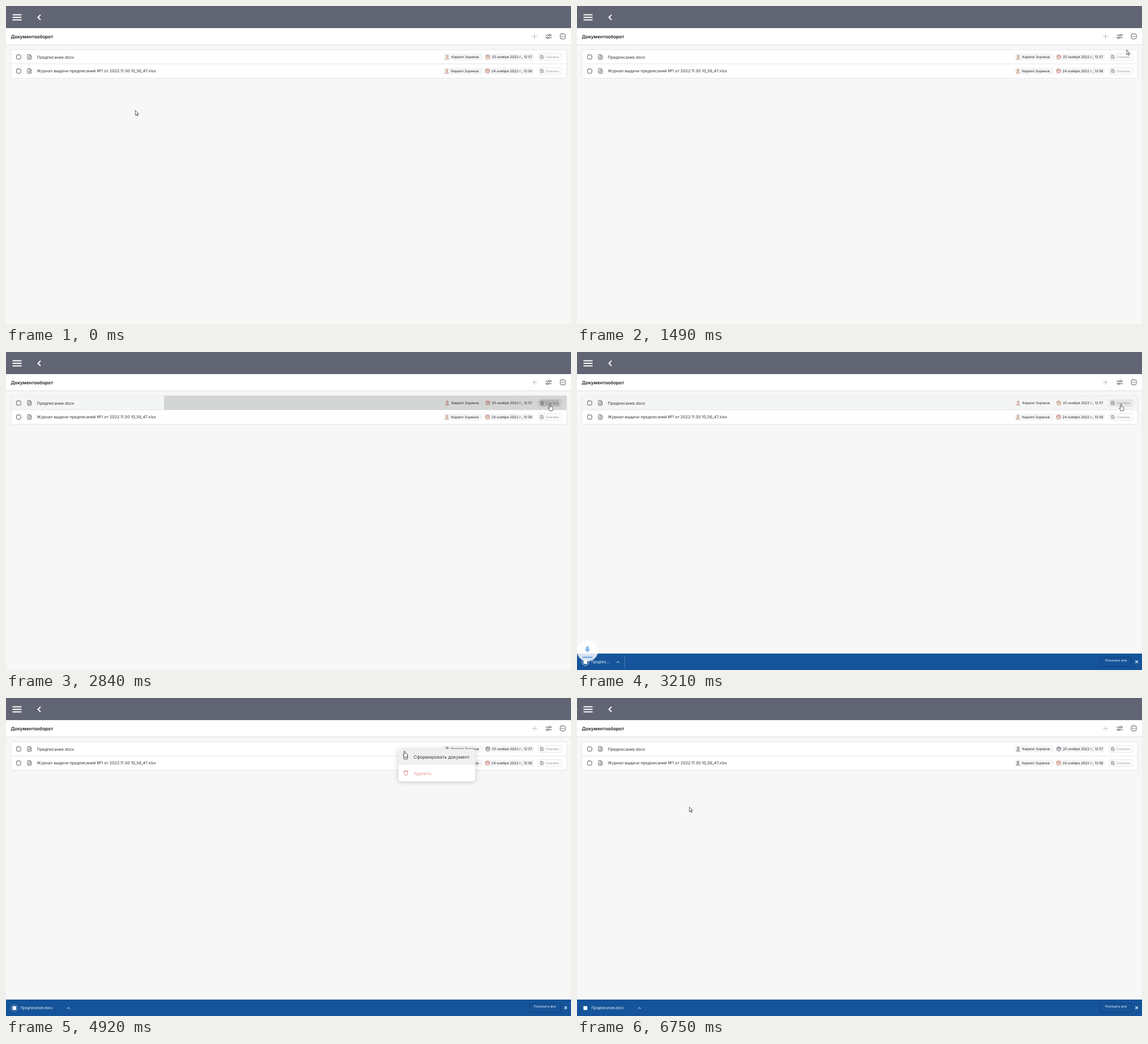
These frames come from a looping animation (998 by 561 pixels, 6780 ms). An HTML page:

```html
<!DOCTYPE html>
<html lang="ru">
<head>
<meta charset="utf-8">
<title>Документооборот</title>
<style>
html, body { margin: 0; width: 100%; height: 100%; overflow: hidden; background: #f7f7f7; }
#stage { position: relative; width: 998px; height: 561px; overflow: hidden; }
svg { position: absolute; left: 0; top: 0; display: block; overflow: visible; }
text { font-family: Inter, sans-serif; text-rendering: geometricPrecision; }
.title { font-size: 8.1px; font-weight: 600; fill: #1b1b1f; }
.file { font-size: 7.15px; fill: #333338; }
.meta { font-size: 6.1px; fill: #26262b; }
.save { font-size: 6.1px; fill: #96969b; }
.item { font-size: 8px; fill: #3c3c42; }
.line { fill: none; stroke: #45454c; stroke-width: .9; stroke-linecap: round; stroke-linejoin: round; }
.white { fill: none; stroke: #fff; stroke-width: 2; }
.chip { fill: #f4f5f6; }

.move, .step { animation: 6780ms linear infinite; }
.step { animation-timing-function: step-end; }

#cursor { animation-name: travel; }
#arrow { animation-name: arrow; }
#hand { animation-name: hand; }
#hover1 { animation-name: hover1; }
#hover2 { animation-name: hover2; }
#hoverBtn { animation-name: hoverBtn; }
#hoverItem { animation-name: hoverItem; }
#press { animation-name: press; }
#menu { animation-name: menu; transform-origin: 693px 90px; filter: drop-shadow(0 1.5px 4px rgba(0,0,0,.2)); }
#wave { animation-name: wave; }
#waveBtn { animation-name: waveBtn; }
.tint { animation-name: tint; }

@keyframes travel {
  0%, 2.51% { transform: translate(228px, 184px); }
  6.9% { transform: translate(500px, 173.5px); }
  12.1%, 12.54% { transform: translate(791px, 192px); }
  21.97%, 23.6% { transform: translate(970.5px, 77px); }
  29.94%, 48.97% { transform: translate(961px, 92px); }
  58.56%, 59% { transform: translate(716px, 90px); }
  65%, 69.47% { transform: translate(693px, 89.5px); }
  72.57% { transform: translate(704px, 93px); }
  78.32%, 79.5% { transform: translate(720px, 136px); }
  87.9%, 90.56% { transform: translate(520px, 246px); }
  99.56%, 100% { transform: translate(198px, 192px); }
}
@keyframes arrow {
  0%, 21.8% { opacity: 1; }
  17.9%, 23.8%, 76.5% { opacity: 0; }
  76.5%, 100% { opacity: 1; }
}
@keyframes hand {
  0%, 21.8% { opacity: 0; }
  17.9%, 23.8% { opacity: 1; }
  76.5%, 100% { opacity: 0; }
}
@keyframes hover2 { 0%, 19.9%, 100% { opacity: 0; } 17.9% { opacity: 1; } }
@keyframes hover1 { 0%, 21.7%, 67.9%, 100% { opacity: 0; } 19.9%, 23.8% { opacity: 1; } }
@keyframes hoverBtn { 0%, 49.8%, 100% { opacity: 0; } 25% { opacity: 1; } }
@keyframes hoverItem { 0%, 76%, 100% { opacity: 0; } 69.6% { opacity: 1; } }
@keyframes press {
  0%, 65%, 68%, 100% { opacity: 0; }
  65.5%, 67% { opacity: 1; }
}
@keyframes menu {
  0%, 67.4% { opacity: 0; transform: scale(.8); }
  68.9%, 76.4% { opacity: 1; transform: none; }
  78.2%, 100% { opacity: 0; transform: none; }
}
@keyframes wave {
  0%, 40.4% { transform: scale(0); opacity: .13; animation-timing-function: cubic-bezier(.4, 0, .2, 1); }
  43.73%, 44.25% { transform: scale(1); opacity: .13; }
  46.5%, 100% { transform: scale(1); opacity: 0; }
}
@keyframes waveBtn {
  0%, 40.4% { transform: scale(0); opacity: .1; animation-timing-function: cubic-bezier(.4, 0, .2, 1); }
  43.73%, 44.25% { transform: scale(1); opacity: .1; }
  46.5%, 100% { transform: scale(1); opacity: 0; }
}
@keyframes tint { 0% { stroke: #b5694a; } 67.9%, 100% { stroke: #4a4a52; } }

#bar { position: absolute; left: 0; top: 531.5px; width: 998px; height: 29.5px; background: #15549a; animation-name: bar; }
#bar, #bar span { font: 6.25px "Open Sans", "Noto Sans", sans-serif; color: #fff; }
#load { position: absolute; left: 0; top: 0; height: 29.5px; overflow: hidden; animation-name: load; }
#load::after { content: ""; position: absolute; right: 0; top: 4px; width: .8px; height: 22px; background: #4a7db4; }
#name { position: absolute; left: 25.5px; right: 25px; top: 10px; line-height: 10px; white-space: nowrap; overflow: hidden; text-overflow: ellipsis; }
#caret { right: 9px; left: auto; top: 12px; }
#all { position: absolute; left: 924px; top: 6.5px; width: 54px; height: 15px; border: .8px solid #0d3f78; border-radius: 2px; text-align: center; font-size: 6.1px !important; line-height: 15px; }
#ring { animation-name: ring; }
#drop { animation-name: drop; }
@keyframes bar {
  0%, 44.1% { transform: translateY(30px); }
  46%, 100% { transform: none; }
}
@keyframes load {
  0%, 45.4% { width: 25px; }
  47.35% { width: 84.5px; }
  50.4%, 100% { width: 123.3px; }
}
@keyframes ring {
  0%, 48% { opacity: .9; }
  54% { opacity: .3; }
  60% { opacity: .8; }
  66.5% { opacity: .85; }
  72.6% { opacity: .45; }
  77% { opacity: .2; }
  82% { opacity: .6; }
  87.9%, 100% { opacity: 0; }
}
@keyframes drop {
  0%, 42.04% { transform: translate(18.5px, 504px); opacity: 0; }
  44.25% { transform: translate(18.5px, 513.5px); opacity: .7; }
  46.46% { transform: translate(18.5px, 523px); opacity: .93; }
  48.67% { transform: translate(18.5px, 532.5px); opacity: .7; }
  50.88%, 100% { transform: translate(18.5px, 542px); opacity: 0; }
}
</style>
</head>
<body>
<div id="stage">
<svg width="998" height="561" viewBox="0 0 998 561">
  <defs>
    <clipPath id="rowClip"><rect x="9" y="77.5" width="981" height="24.5"/></clipPath>
    <clipPath id="btnClip"><rect x="940" y="84" width="42" height="12" rx="2"/></clipPath>
    <g id="fileIcons" class="line">
      <rect x="18.6" y="86.2" width="7.6" height="7.6" rx="2"/>
      <path d="M39.2 85.8h3.1l2.2 2.2v5.2a1 1 0 0 1-1 1h-4.3a1.2 1.2 0 0 1-1.2-1.2v-6a1.2 1.2 0 0 1 1.2-1.2zM42.2 86v2.2h2.2M39.8 90h3M39.8 92h3" stroke-width=".8"/>
    </g>
    <g id="chips" class="chip">
      <rect x="773" y="84" width="69" height="12" rx="2.5"/>
      <rect x="844.5" y="84" width="87.5" height="12" rx="2.5"/>
    </g>
    <g id="user">
      <circle cx="779.2" cy="88.1" r="1.7"/>
      <path d="M776.7 93.2c0-3.6 5-3.6 5 0z"/>
    </g>
    <g id="date">
      <rect x="847.9" y="86.6" width="6.4" height="6.6" rx="2"/>
      <path d="M848.2 88.6h5.8M849.6 90.8h.3M851 90.8h.3M852.4 90.8h.3"/>
    </g>
    <g id="saveBtn">
      <rect x="940" y="84" width="41.6" height="11.8" rx="2" fill="none" stroke="#dedede" stroke-width=".8"/>
      <path class="line" stroke="#77777d" d="M944.6 87h3.5l1.3 1.3v3.6a1 1 0 0 1-1 1h-3.8a1 1 0 0 1-1-1v-3.9a1 1 0 0 1 1-1zM945 87.2v1.7h2.5v-1.7M944.9 92.8v-2.3h3.2v2.3" style="stroke-width:.7;stroke:#77777d"/>
      <text class="save" x="953" y="92.2">Скачать</text>
    </g>
  </defs>

  <rect width="998" height="561" fill="#f7f7f7"/>
  <rect width="998" height="39" fill="#616473"/>
  <path class="white" d="M11.5 15.5h16M11.5 20h16M11.5 24.5h16"/>
  <path class="white" d="M61 15.5L56.5 20l4.5 4.5"/>
  <rect y="39" width="998" height="29.5" fill="#fff"/>
  <rect y="68" width="998" height=".9" fill="#dcdcdd"/>
  <text class="title" x="8.4" y="56.5">Документооборот</text>
  <path class="line" d="M929.6 53.6h8M933.6 49.6v8" style="stroke:#b4b4b8"/>
  <g class="line">
    <path d="M953.6 51.4h4.9M962 51.4h1.6M953.6 55.9h1.4M958.5 55.9h5.1"/>
    <circle cx="960.3" cy="51.4" r="1.7"/><circle cx="956.7" cy="55.9" r="1.7"/>
    <rect x="979" y="49.1" width="9" height="9" rx="2.6"/>
    <path d="M981.3 53.6h.2M983.4 53.6h.2M985.5 53.6h.2" stroke-width="1.2"/>
  </g>

  <rect x="8.5" y="77.2" width="982" height="50.2" rx="2" fill="#fff" stroke="#e1e1e2" stroke-width=".9"/>
  <use href="#chips"/>
  <use href="#chips" y="24.8"/>
  <rect id="hover1" class="step" x="9" y="77.7" width="981" height="24" fill="#f4f5f5"/>
  <rect id="hover2" class="step" x="9" y="102" width="981" height="25" fill="#f4f5f5"/>
  <path d="M9 102h981" stroke="#e1e1e2" stroke-width=".9"/>
  <rect id="hoverBtn" class="step" x="940" y="84" width="41.6" height="11.8" rx="2" fill="#e6e7e7"/>

  <use href="#fileIcons"/>
  <use href="#fileIcons" y="24.8"/>
  <text class="file" x="54.6" y="92.6">Предписание.docx</text>
  <text class="file" x="54.6" y="117.4">Журнал выдачи предписаний №1 от 2022.11.30 10_56_47.xlsx</text>
  <g fill="none" stroke-width=".8" stroke-linecap="round">
    <g class="step tint">
      <use href="#user"/><use href="#date"/><use href="#user" x="-.4" y="24.8"/>
    </g>
    <use href="#date" x="-.4" y="24.8" stroke="#c0563f"/>
  </g>
  <text class="meta" x="786.5" y="92.1">Кирилл Зорянов</text>
  <text class="meta" x="786" y="116.9">Кирилл Зорянов</text>
  <text class="meta" x="858.2" y="92.1">25 ноября 2022 г., 12:57</text>
  <text class="meta" x="857.6" y="116.9">24 ноября 2022 г., 13:56</text>
  <use href="#saveBtn"/>
  <use href="#saveBtn" y="24.8"/>

  <g clip-path="url(#rowClip)"><g transform="translate(961 92)"><circle id="wave" class="move" r="965"/></g></g>
  <g clip-path="url(#btnClip)"><g transform="translate(961 92)"><circle id="waveBtn" class="move" r="23"/></g></g>

  <g id="menu" class="move">
    <rect x="693" y="90" width="135.8" height="57.3" rx="5" fill="#fff"/>
    <path id="hoverItem" class="step" d="M693 118V95a5 5 0 0 1 5-5h125.8a5 5 0 0 1 5 5v23z" fill="#f0f0f0"/>
    <path class="line" d="M703.8 99.6h3.6l2 2v5.2a1 1 0 0 1-1 1h-4.6a1 1 0 0 1-1-1v-6.2a1 1 0 0 1 1-1z"/>
    <text class="item" x="719.8" y="106.5">Сформировать документ</text>
    <path class="line" d="M702.4 129h8M703.2 129.2l.6 6.2a1 1 0 0 0 1 .9h3.2a1 1 0 0 0 1-.9l.6-6.2M704.4 128.8q2-1.4 4 0" style="stroke:#e2837b"/>
    <text class="item" x="719.8" y="135.6" style="fill:#e6948d">Удалить</text>
  </g>

  <circle id="press" class="move" cx="693" cy="89.3" r="6.5" fill="#f0707a"/>
  <g id="cursor" class="move" stroke="#2b2b30" stroke-width=".8" fill="#fff" stroke-linejoin="round">
    <path id="arrow" class="step" d="M.4.4v8.4l1.9-1.8 1.4 3 1.4-.6-1.4-2.9h2.6z"/>
    <path id="hand" class="step" d="M-1 1.2a.95.95 0 0 1 1.9 0v3.3q1.2-.5 1.5.4 1.1-.4 1.4.5 1.2-.2 1.2 1v2.4q0 1.2-.9 2v1H-.5v-.9L-2.9 7.6q-.5-1.3.7-1.2L-1 7.4z"/>
  </g>
</svg>

<div id="bar" class="move">
  <div id="load" class="move">
    <svg width="24" height="29" viewBox="0 0 24 29">
      <circle id="ring" class="move" cx="14.8" cy="15" r="6.2" fill="none" stroke="#d9e6f4" stroke-width=".9"/>
      <rect x="11.4" y="11.6" width="6.8" height="6.8" fill="#fff"/>
    </svg>
    <span id="name">Предписание.docx</span>
    <svg id="caret" width="7" height="6" viewBox="0 0 7 6"><path d="M1 4.4l2.4-2.5 2.4 2.5" fill="none" stroke="#fff"/></svg>
  </div>
  <span id="all">Показать все</span>
  <svg width="998" height="29" viewBox="0 0 998 29"><path d="M986.3 12.2l4.6 4.6M990.9 12.2l-4.6 4.6" stroke="#fff" stroke-width="1.1"/></svg>
</div>

<svg width="998" height="561" viewBox="0 0 998 561">
  <g id="drop" class="move">
    <circle r="18.8" fill="#fff"/>
    <path d="M-2.2-7.5h4.4v4.7h3L0 3.2l-5.2-6h3zM-8.5 10.8h17v2h-17z" fill="#6fa8f2"/>
  </g>
</svg>
</div>
</body>
</html>
```
